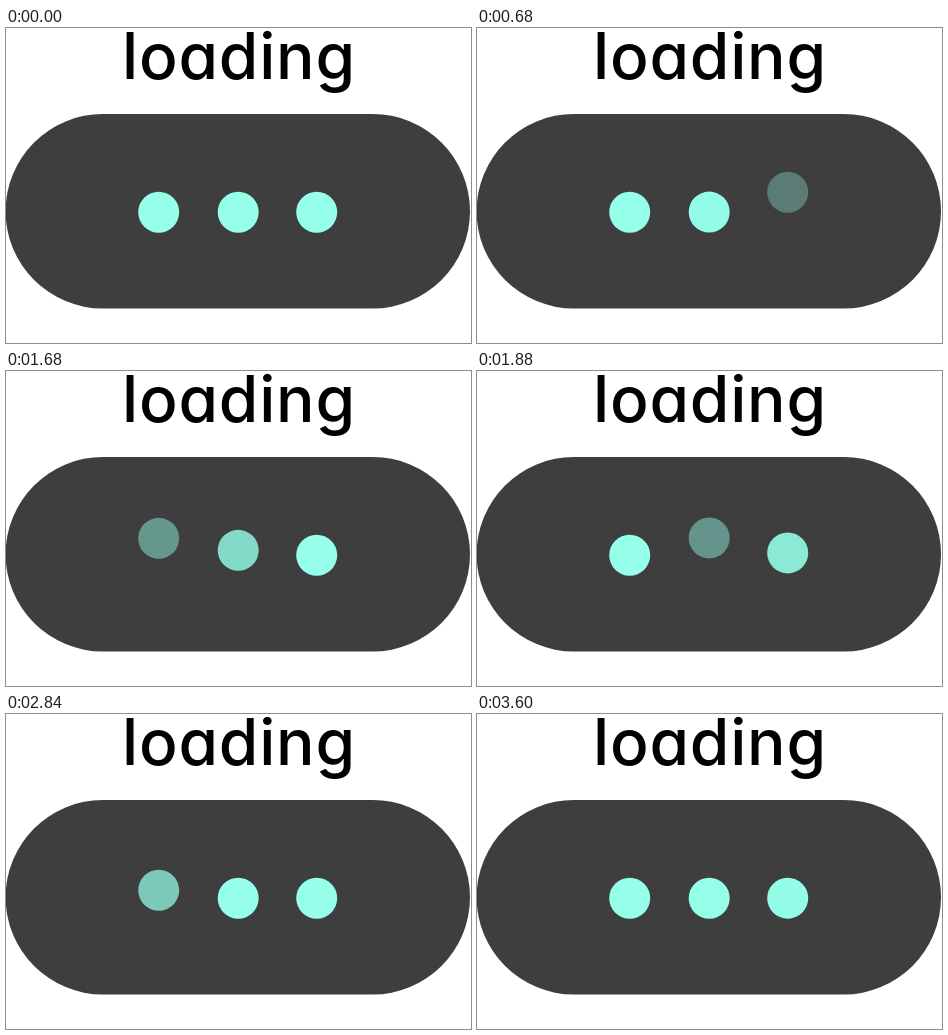
Animation, 465 px wide and 315 px high, one loop 4.04 s. Source, as an HTML page:

```html
<!DOCTYPE html>
<html lang="en">
<head>
<meta charset="utf-8">
<title>Loading</title>
<style>
  html, body { margin: 0; width: 100%; height: 100%; overflow: hidden; background: #fff; }
  svg { display: block; width: 100vw; height: 100vh; }
  text {
    font: 500 64px Inter, "Open Sans", sans-serif;
    font-optical-sizing: none;
    font-feature-settings: "cv11";
    letter-spacing: 0.8px;
    text-anchor: middle;
  }
</style>
</head>
<body>
<svg viewBox="0 0 465 315">
  <text x="233" y="50.5">loading</text>
  <rect x="-0.4" y="86" width="464.4" height="194.5" rx="97.25" fill="#3e3e3e"/>
  <g id="dots" fill="#95ffea"></g>
</svg>
<script>
const LOOP = 4040, CYCLE = 1360, STEP = 40;
const REST_Y = 184.2, LIFT = 20, FADE = 0.68;

// Each hop rises from start to peak, then falls until end (ms within a cycle).
const dots = [
  { x: 152.7, start: 20, peak: 250, end: 520 },
  { x: 232.2, start: 249, peak: 466, end: 690 },
  { x: 310.7, start: 475, peak: 680, end: 885 }
];

const group = document.getElementById("dots");
for (const dot of dots) {
  dot.node = document.createElementNS("http://www.w3.org/2000/svg", "circle");
  dot.node.setAttribute("cx", dot.x);
  dot.node.setAttribute("r", 20.5);
  group.append(dot.node);
}

const clamp = u => Math.min(1, Math.max(0, u));
const ease = u => (1 - Math.cos(Math.PI * u)) / 2;

function progress(t, { start, peak, end }) {
  return clamp(t < peak ? (t - start) / (peak - start) : (end - t) / (end - peak));
}

function draw(ms) {
  const t = Math.floor((ms % LOOP) / STEP) * STEP % CYCLE;
  for (const dot of dots) {
    const u = progress(t, dot);
    const height = ease(u);
    // The fade is eased more gently than the movement.
    const fade = (u + height) / 2;
    dot.node.setAttribute("cy", REST_Y - LIFT * height);
    dot.node.setAttribute("opacity", 1 - FADE * fade);
  }
}

const begin = performance.now();
function tick() {
  draw(performance.now() - begin);
  requestAnimationFrame(tick);
}
tick();
</script>
</body>
</html>
```
